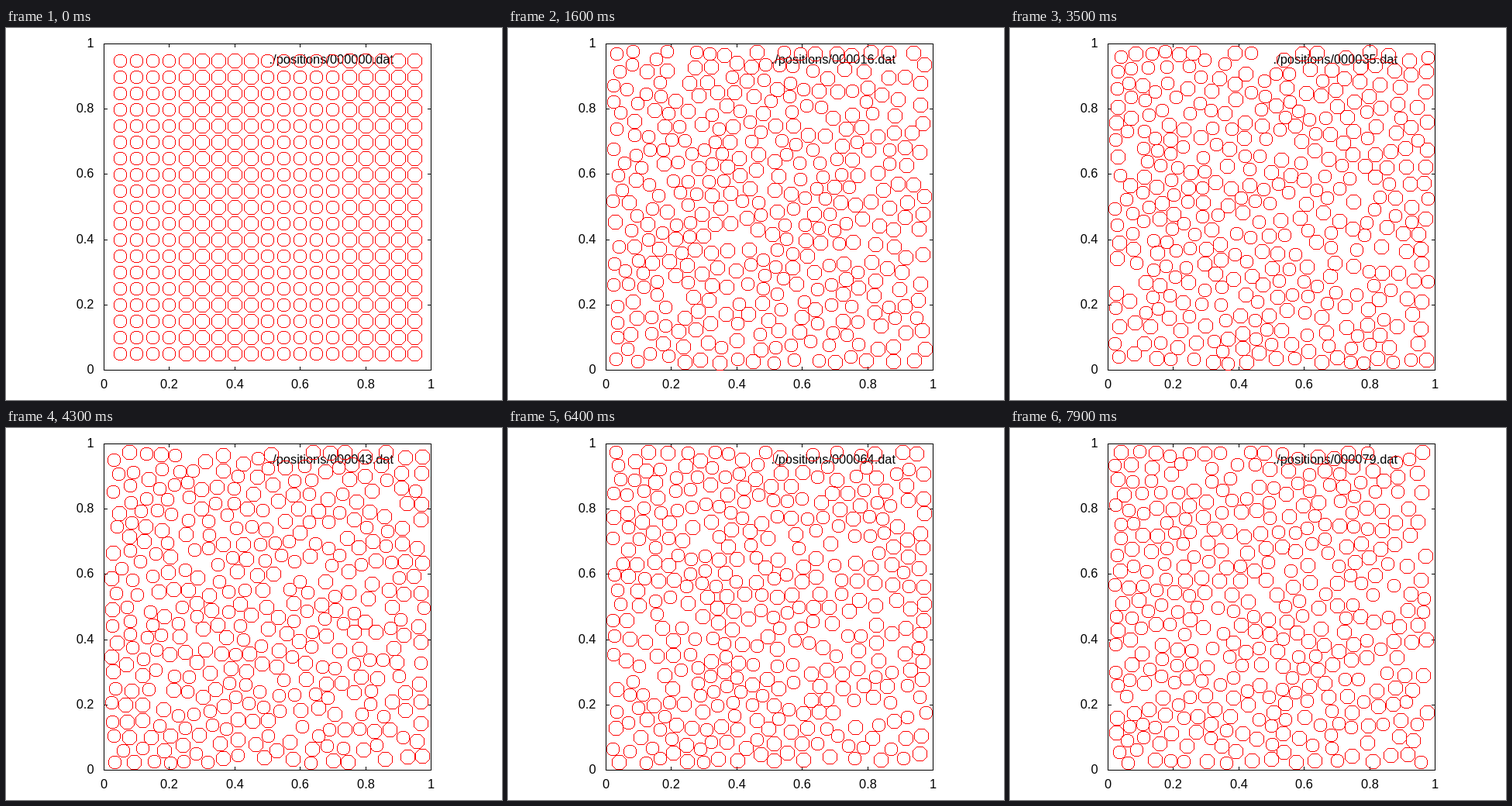
An HTML page with a canvas that plays this animation: 640 px wide and 480 px high, repeating every 8 s.

```html
<!DOCTYPE html>
<html lang="en">
<head>
<meta charset="utf-8">
<title>Disc positions</title>
<style>
  html, body { margin: 0; width: 100%; height: 100%; overflow: hidden; background: #fff; }
  svg, canvas { position: absolute; left: 0; top: 0; width: 640px; height: 480px; }
  text { font: 16.4px "Liberation Sans", Arial, sans-serif; fill: #000; }
  path { fill: none; stroke: #000; shape-rendering: crispEdges; }
</style>
</head>
<body>
<svg viewBox="0 0 640 480"><path id="axes"/><g id="labels"></g><text id="title" x="500" y="46" text-anchor="end"></text></svg>
<canvas id="stage" width="640" height="480"></canvas>
<script>
const STEP = 100, COUNT = 80, SUBSTEPS = 60, SPEED = 40;
const LEFT = 126, RIGHT = 548, TOP = 20, BOTTOM = 441;
const WIDTH = RIGHT - LEFT, HEIGHT = BOTTOM - TOP;
const SMALL = 8.4, LARGE = 9.4;
const $ = id => document.getElementById(id);
const ctx = $('stage').getContext('2d');

function drawAxes() {
  let d = `M${LEFT}.5 ${TOP}.5H${RIGHT}.5V${BOTTOM}.5H${LEFT}.5Z`;
  const label = (x, y, anchor, value) => {
    const t = document.createElementNS('http://www.w3.org/2000/svg', 'text');
    t.setAttribute('x', x);
    t.setAttribute('y', y);
    t.setAttribute('text-anchor', anchor);
    t.textContent = value;
    $('labels').append(t);
  };
  for (let i = 0; i <= 5; i++) {
    const x = Math.round(LEFT + WIDTH * i / 5), y = Math.round(BOTTOM - HEIGHT * i / 5);
    const value = String(i / 5);
    label(x + 0.5, 465, 'middle', value);
    label(113.5, y + 5, 'end', value);
    if (i % 5) {
      d += `M${x}.5 ${TOP}v5M${x}.5 ${BOTTOM + 1}v-5`;
      d += `M${LEFT} ${y}.5h5M${RIGHT + 1} ${y}.5h-5`;
    }
  }
  $('axes').setAttribute('d', d);
}

// One-pixel ring from its first octant, mirrored eight ways.
function ring(octant) {
  const c = document.createElement('canvas');
  c.width = c.height = 19;
  const g = c.getContext('2d');
  g.fillStyle = '#f00';
  for (const [a, b] of octant)
    for (const [x, y] of [[a, b], [b, a]])
      for (const sx of [-1, 1])
        for (const sy of [-1, 1]) g.fillRect(9 + sx * x, 9 + sy * y, 1, 1);
  return c;
}
const smallRing = ring([[0, 8], [1, 8], [2, 8], [3, 8], [4, 7], [5, 7], [6, 6]]);
const largeRing = ring([[0, 9], [1, 9], [2, 9], [3, 9], [4, 9], [5, 8], [6, 7]]);

let seed = 20117;
function random() {
  seed = (seed + 0x6D2B79F5) | 0;
  let t = Math.imul(seed ^ (seed >>> 15), 1 | seed);
  t = (t + Math.imul(t ^ (t >>> 7), 61 | t)) ^ t;
  return ((t ^ (t >>> 14)) >>> 0) / 4294967296;
}

function makeDiscs() {
  const discs = [];
  for (let col = 1; col <= 19; col++) {
    for (let row = 1; row <= 19; row++) {
      const r = Math.floor(col / 5) % 2 ? LARGE : SMALL;
      const speed = SPEED * Math.sqrt(-2 * Math.log(1 - random()));
      const angle = 2 * Math.PI * random();
      discs.push({
        x: WIDTH * col / 20, y: HEIGHT * row / 20, r, m: r * r,
        vx: speed * Math.cos(angle), vy: speed * Math.sin(angle)
      });
    }
  }
  return discs;
}

function collide(a, b) {
  const dx = b.x - a.x, dy = b.y - a.y, reach = a.r + b.r;
  const d2 = dx * dx + dy * dy;
  if (d2 >= reach * reach || d2 === 0) return;
  const d = Math.sqrt(d2), nx = dx / d, ny = dy / d;
  const push = (reach - d) / 2;
  a.x -= nx * push; a.y -= ny * push;
  b.x += nx * push; b.y += ny * push;
  const approach = (a.vx - b.vx) * nx + (a.vy - b.vy) * ny;
  if (approach <= 0) return;
  const j = 2 * approach / (a.m + b.m);
  a.vx -= j * b.m * nx; a.vy -= j * b.m * ny;
  b.vx += j * a.m * nx; b.vy += j * a.m * ny;
}

function bounce(p) {
  const edge = p.r + 0.6;
  if (p.x < edge) { p.x = edge; p.vx = Math.abs(p.vx); }
  if (p.x > WIDTH - edge) { p.x = WIDTH - edge; p.vx = -Math.abs(p.vx); }
  if (p.y < edge) { p.y = edge; p.vy = Math.abs(p.vy); }
  if (p.y > HEIGHT - edge) { p.y = HEIGHT - edge; p.vy = -Math.abs(p.vy); }
}

// Insertion sort: the list stays nearly ordered between substeps.
function sortByX(list) {
  for (let i = 1; i < list.length; i++) {
    const p = list[i];
    let k = i - 1;
    while (k >= 0 && list[k].x > p.x) { list[k + 1] = list[k]; k--; }
    list[k + 1] = p;
  }
}

const discs = makeDiscs();
const snapshot = () => discs.map(({ x, y, r }) => ({ x, y, r }));
const states = [snapshot()];

function advance() {
  for (let s = 0; s < SUBSTEPS; s++) {
    for (const p of discs) {
      p.x += p.vx / SUBSTEPS;
      p.y += p.vy / SUBSTEPS;
    }
    sortByX(discs);
    for (let i = 0; i < discs.length; i++) {
      const a = discs[i];
      for (let k = i + 1; k < discs.length && discs[k].x - a.x < 2 * LARGE; k++) collide(a, discs[k]);
    }
    discs.forEach(bounce);
  }
  states.push(snapshot());
}

let shown = -1;
function show(index) {
  if (index === shown) return;
  shown = index;
  while (states.length <= index) advance();
  $('title').textContent = `./positions/${String(index).padStart(6, '0')}.dat`;
  ctx.clearRect(0, 0, 640, 480);
  for (const p of states[index]) {
    const x = Math.round(LEFT + p.x), y = Math.round(TOP + 0.5 + p.y);
    ctx.drawImage(p.r === LARGE ? largeRing : smallRing, x - 9, y - 9);
  }
}

drawAxes();
show(0);
const start = performance.now();
function tick() {
  show(Math.floor((performance.now() - start) / STEP) % COUNT);
  requestAnimationFrame(tick);
}
requestAnimationFrame(tick);
</script>
</body>
</html>
```
